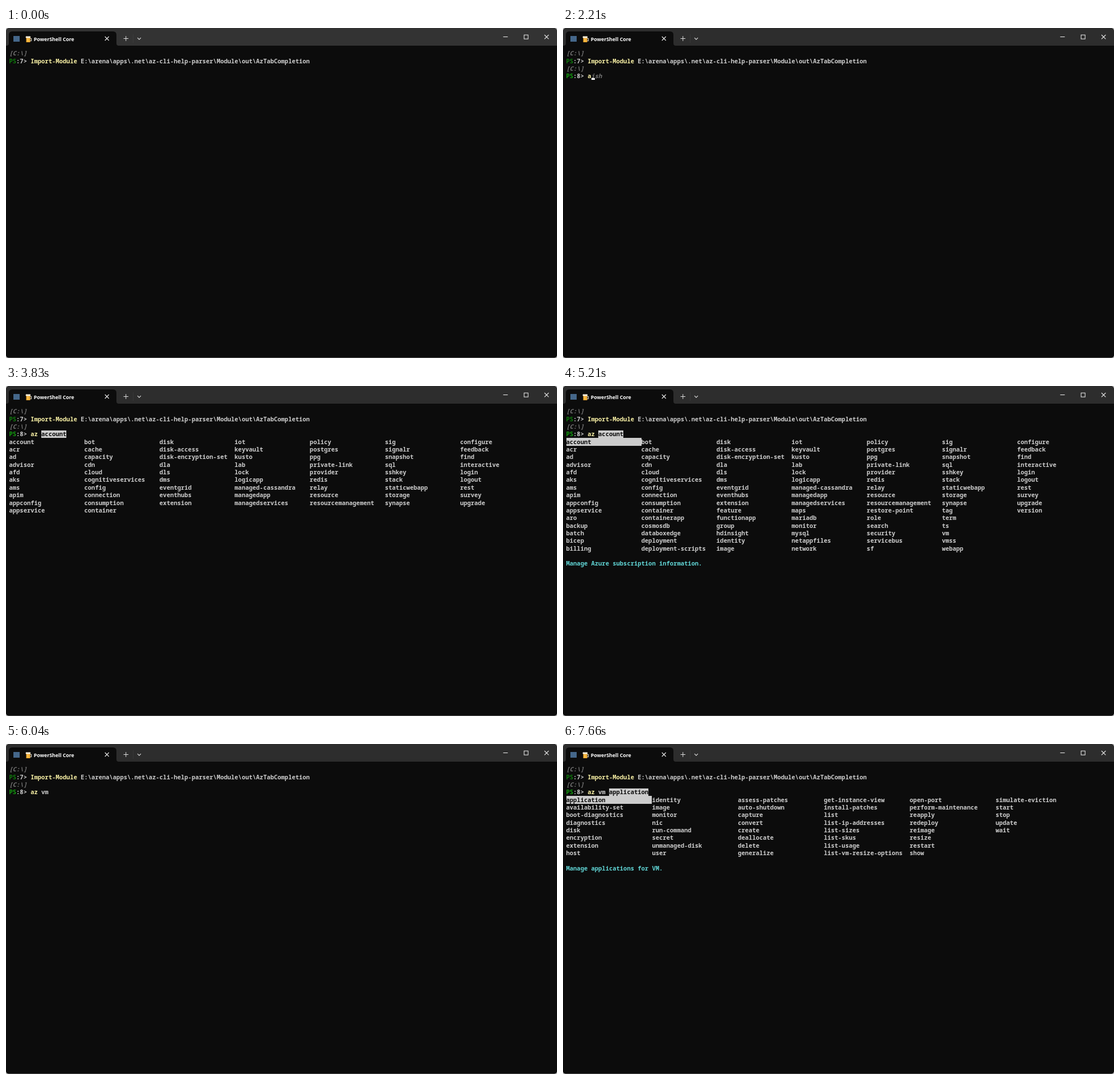
An HTML page with a canvas that plays this animation: 968x579 px, repeating every 8 s.

```html
<!DOCTYPE html>
<html lang="en">
<head>
<meta charset="utf-8">
<title>Terminal tab completion</title>
<style>
  html, body { margin: 0; width: 100%; height: 100%; overflow: hidden; background: #0c0c0c; }
  canvas { display: block; width: 968px; height: 579px; }
</style>
</head>
<body>
<canvas id="stage" width="968" height="579"></canvas>
<script>
const ctx = document.getElementById('stage').getContext('2d');
const W = 968, H = 579, LOOP = 8000;
const CW = 6.287, RH = 13.36, X0 = 5.5, Y0 = 37.9;
const MONO = '"Noto Sans Mono", "DejaVu Sans Mono", monospace';
const BG = '#0c0c0c', FG = '#cccccc', DIM = '#767676', GREEN = '#13a10e',
      YELLOW = '#f9f1a5', CYAN = '#61d6d6', WHITE = '#f2f2f2';

const words = s => s.trim().split(/\s+/);
const services = {
  width: 21, rows: 15, note: 'Manage Azure subscription information.',
  items: words(`account acr ad advisor afd aks ams apim appconfig appservice aro backup batch bicep billing
    bot cache capacity cdn cloud cognitiveservices config connection consumption container containerapp
    cosmosdb databoxedge deployment deployment-scripts
    disk disk-access disk-encryption-set dla dls dms eventgrid eventhubs extension feature functionapp
    group hdinsight identity image
    iot keyvault kusto lab lock logicapp managed-cassandra managedapp managedservices maps mariadb
    monitor mysql netappfiles network
    policy postgres ppg private-link provider redis relay resource resourcemanagement restore-point role
    search security servicebus sf
    sig signalr snapshot sql sshkey stack staticwebapp storage synapse tag term ts vm vmss webapp
    configure feedback find interactive login logout rest survey upgrade version`)
};
const vmNote = 'Manage Linux or Windows virtual machines.';
const filtered = { width: 9, rows: 1, note: vmNote, items: words('vm vmss version') };
const narrowed = { width: 6, rows: 1, note: vmNote, items: words('vm vmss') };
const actions = {
  width: 24, rows: 8, note: 'Manage applications for VM.',
  items: words(`application availability-set boot-diagnostics diagnostics disk encryption extension host
    identity image monitor nic run-command secret unmanaged-disk user
    assess-patches auto-shutdown capture convert create deallocate delete generalize
    get-instance-view install-patches list list-ip-addresses list-sizes list-skus list-usage
    list-vm-resize-options
    open-port perform-maintenance reapply redeploy reimage resize restart show
    simulate-eviction start stop update wait`)
};

// Each step holds from its time on: cmd / arg / sel / hint make up the input line.
const steps = [
  { t: 0 },
  { t: 470, cur: [84, 1] },
  { t: 1000 },
  { t: 1390, prompt: 1, cur: [6, 3] },
  { t: 1930, prompt: 1 },
  { t: 2210, prompt: 1, cmd: 'a', hint: 'ish', cur: [7, 3] },
  { t: 2540, prompt: 1, cmd: 'az', hint: ' vm', cur: [8, 3] },
  { t: 2680, prompt: 1, cmd: 'az', hint: ' vm', cur: [9, 3] },
  { t: 3090, prompt: 1, cmd: 'az', ask: 'Display all 100 possibilities? (y or n) _' },
  { t: 3760, prompt: 1, cmd: 'az', arg: ' ', sel: 'account' },
  { t: 3830, prompt: 1, cmd: 'az', arg: ' ', sel: 'account', menu: services, cells: 65 },
  { t: 3900, prompt: 1, cmd: 'az', arg: ' ', sel: 'account', menu: services, cur: [9, 3] },
  { t: 4430, prompt: 1, cmd: 'az', arg: ' ', sel: 'account', menu: services },
  { t: 5020, prompt: 1, cmd: 'az', arg: ' ', sel: 'account', menu: services, cur: [9, 3] },
  { t: 5210, prompt: 1, cmd: 'az', arg: ' ', sel: 'account', menu: services },
  { t: 5280, prompt: 1, cmd: 'az', arg: ' v', sel: 'm', menu: filtered },
  { t: 5410, prompt: 1, cmd: 'az', arg: ' vm', menu: narrowed },
  { t: 5480, prompt: 1, cmd: 'az', arg: ' vm', menu: narrowed, cur: [11, 3] },
  { t: 6040, prompt: 1, cmd: 'az', arg: ' vm' },
  { t: 6140, prompt: 1, cmd: 'az', arg: ' vm ', hint: 'create -h', cur: [12, 3] },
  { t: 6730, prompt: 1, cmd: 'az', arg: ' vm ', hint: 'create -h' },
  { t: 6920, prompt: 1, cmd: 'az', arg: ' vm ', hint: 'create -h', cur: [12, 3] },
  { t: 6990, prompt: 1, cmd: 'az', arg: ' vm ', hint: 'create -h' },
  { t: 7060, prompt: 1, cmd: 'az', arg: ' vm ', sel: 'application', menu: actions, cur: [12, 3] },
  { t: 7660, prompt: 1, cmd: 'az', arg: ' vm ', sel: 'application', menu: actions }
];

const colX = c => X0 + c * CW;
const rowY = r => Y0 + r * RH;

function rect(x, y, w, h, color) {
  ctx.fillStyle = color;
  ctx.fillRect(x, y, w, h);
}

function line(points, color, width = 1) {
  ctx.strokeStyle = color;
  ctx.lineWidth = width;
  ctx.beginPath();
  points.forEach(([x, y, move], i) => i && !move ? ctx.lineTo(x, y) : ctx.moveTo(x, y));
  ctx.stroke();
}

// Writes on the character grid and returns the next column.
function put(text, col, row, color, style = '600') {
  ctx.font = `${style} 10.478px ${MONO}`;
  ctx.fillStyle = color;
  const y = rowY(row) + 10.3;
  [...text].forEach((ch, i) => { if (ch !== ' ') ctx.fillText(ch, colX(col + i), y); });
  return col + text.length;
}

function mark(text, col, row, width = text.length) {
  const x = Math.round(colX(col)), y = Math.round(rowY(row));
  rect(x, y, Math.round(colX(col + width)) - x, Math.round(rowY(row + 1)) - y, FG);
  put(text, col, row, BG);
  return col + width;
}

function prompt(row, n, green) {
  put('[C:\\]', 0, row, DIM, 'italic 600');
  put('PS', 0, row + 1, green);
  return put(`:${n}> `, 2, row + 1, FG);
}

function drawMenu({ width, rows, items, note }, cells = Infinity) {
  const cols = Math.ceil(items.length / rows);
  items.forEach((item, i) => {
    const c = Math.floor(i / rows), r = i % rows;
    if (r * cols + c >= cells) return;
    if (i === 0 && cells === Infinity) mark(item, 0, 4, width);
    else put(item, c * width, 4 + r, FG);
  });
  if (cells === Infinity) put(note, 0, 5 + rows, CYAN);
}

function drawMug(x, y) {
  ctx.strokeStyle = '#c9c4b8';
  ctx.lineWidth = 1.3;
  ctx.strokeRect(x + 7, y + 4.5, 3, 4);
  rect(x + 1, y + 2, 7, 9, '#f0a629');
  rect(x + 2.5, y + 5, 1, 5, '#ffd166');
  rect(x + 5, y + 5, 1, 5, '#ffd166');
  ctx.fillStyle = '#f5ecd7';
  ctx.beginPath();
  for (const dx of [1.8, 4.4, 7]) ctx.arc(x + dx, y + 2, 1.8, 0, 7);
  ctx.fill();
}

function drawWindow(t) {
  const g = t < 470 ? 51 : t < 530 ? 48 : 45;
  rect(0, 0, W, 31, `rgb(${g},${g},${g})`);
  rect(0, 31, W, H - 31, BG);

  ctx.fillStyle = BG;
  ctx.beginPath();
  ctx.moveTo(1, 31);
  ctx.quadraticCurveTo(5, 31, 5, 27);
  ctx.lineTo(5, 12);
  ctx.quadraticCurveTo(5, 6, 11, 6);
  ctx.lineTo(188, 6);
  ctx.quadraticCurveTo(194, 6, 194, 12);
  ctx.lineTo(194, 27);
  ctx.quadraticCurveTo(194, 31, 198, 31);
  ctx.fill();

  rect(13, 14, 11, 10, '#45678a');
  drawMug(34.5, 14);
  ctx.font = '700 8.8px "Open Sans", "Noto Sans", sans-serif';
  ctx.fillStyle = '#ffffff';
  ctx.fillText('PowerShell Core', 48.7, 22.7);

  const cross = (x, y, d) => line([[x - d, y - d], [x + d, y + d], [x + d, y - d, 1], [x - d, y + d]], '#e8e8e8', 1.1);
  cross(177.3, 18.5, 3.5);
  cross(949.7, 15.7, 3.7);
  line([[206.5, 18.5], [215, 18.5], [210.7, 14.2, 1], [210.7, 22.8]], '#dddddd');
  rect(223, 11, 1, 15, g > 48 ? '#3c3c3c' : '#373737');
  line([[231, 17.2], [234, 20.2], [237, 17.2]], '#dddddd', 1.1);
  line([[873.5, 15.5], [881.5, 15.5]], '#f0f0f0');
  ctx.strokeStyle = '#f0f0f0';
  ctx.lineWidth = 1;
  ctx.strokeRect(910.2, 12.2, 7, 7);

  // bottom edge and the light desktop behind the rounded corners
  rect(0, H - 1, W, 1, '#484848');
  ctx.fillStyle = '#c4c4c4';
  ctx.beginPath();
  ctx.rect(0, 0, W, H);
  ctx.roundRect(0, 0, W, H, 5);
  ctx.fill('evenodd');
}

function drawPointer(t) {
  if (t < 70 || t >= 1330) return;
  const n = Math.min(4, Math.floor((t - 70) / 65));
  const k = 1 - (1 - n / 4) ** 2;
  const x = 925 - 128 * k, y = 567 - 210 * k;
  const shape = [[0, 0], [0, 11], [2.6, 8.6], [4.2, 12], [5.7, 11.3], [4.2, 8], [7.6, 7.8]];
  ctx.beginPath();
  shape.forEach(([dx, dy]) => ctx.lineTo(x + dx, y + dy));
  ctx.closePath();
  ctx.fillStyle = '#ffffff';
  ctx.fill();
  ctx.strokeStyle = '#000000';
  ctx.lineWidth = 0.6;
  ctx.stroke();
}

function draw(t) {
  const s = steps.findLast(step => step.t <= t);
  drawWindow(t);
  let col = put('Import-Module', prompt(0, 7, '#0f7d0c'), 1, YELLOW);
  put('E:\\arena\\apps\\.net\\az-cli-help-parser\\Module\\out\\AzTabCompletion', col + 1, 1, FG);
  if (s.prompt) {
    col = prompt(2, 8, GREEN);
    col = put(s.cmd || '', col, 3, YELLOW);
    col = put(s.arg || '', col, 3, FG);
    if (s.sel) col = mark(s.sel, col, 3);
    put(s.hint || '', col, 3, DIM, 'italic 600');
    put(s.ask || '', 0, 4, FG);
    if (s.menu) drawMenu(s.menu, s.cells);
  }
  if (s.cur) {
    const [c, r] = s.cur;
    rect(Math.round(colX(c)), Math.round(rowY(r + 1)) - 3, 6, 3, WHITE);
  }
  drawPointer(t);
}

const start = performance.now();
function tick() {
  draw((performance.now() - start) % LOOP);
  requestAnimationFrame(tick);
}
tick();
</script>
</body>
</html>
```
